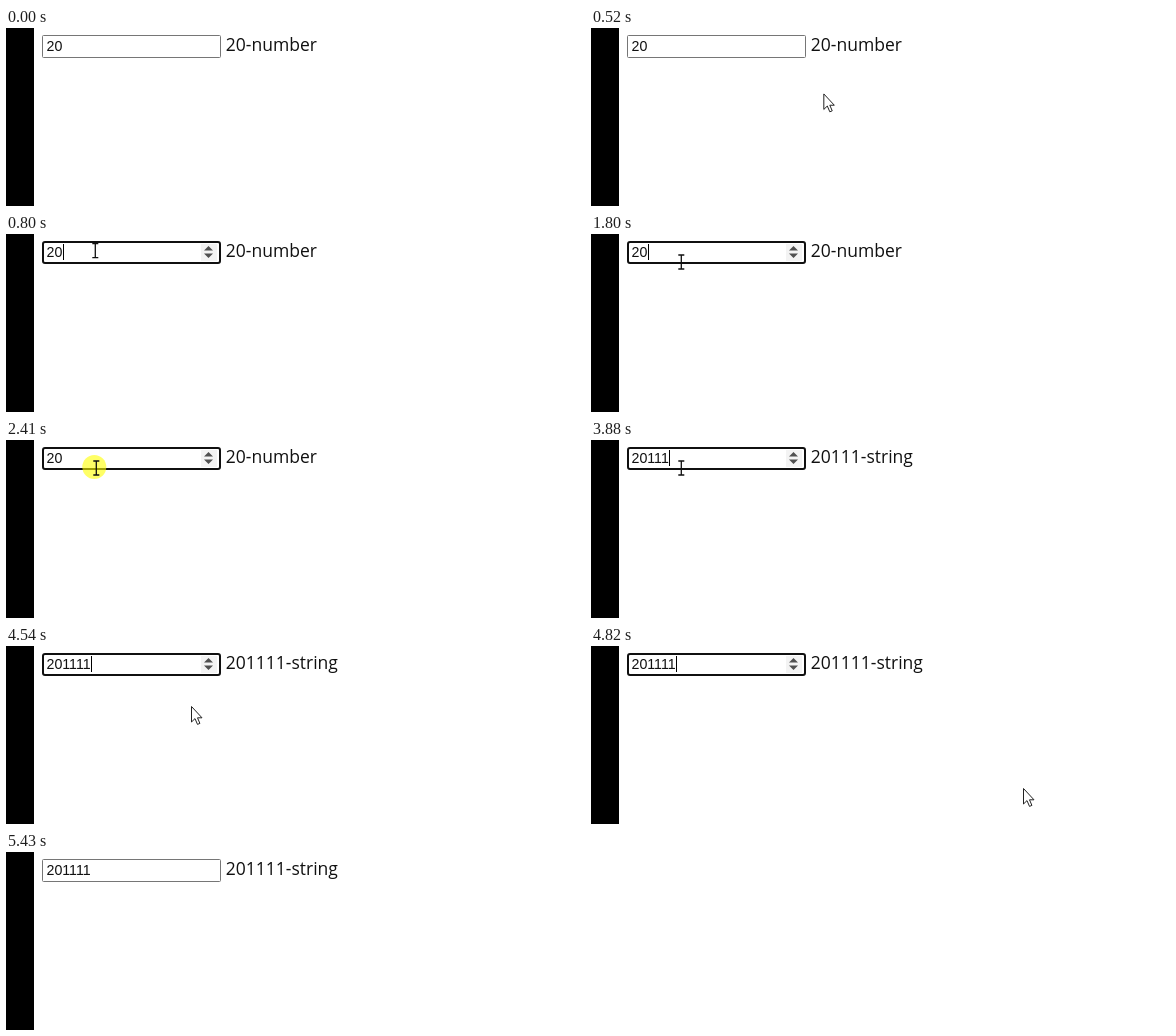
An HTML page that plays this animation: 579 by 178 pixels, repeating every 5500 ms.

```html
<!DOCTYPE html>
<html lang="en">
<head>
<meta charset="utf-8">
<style>
  html, body { margin: 0; width: 100%; height: 100%; overflow: hidden; background: #fff; }
  svg { display: block; }
  #value { font: 14.2px "Liberation Sans", Arial, sans-serif; }
  #label { font: 17.5px "Open Sans", "Noto Sans", sans-serif; }
</style>
</head>
<body>
<svg width="579" height="178" viewBox="0 0 579 178">
  <rect width="579" height="178" fill="#fff"/>
  <rect width="28" height="178"/>
  <rect id="plain" x="36.5" y="7.5" width="178" height="22" rx="1" fill="#fff" stroke="#767676"/>
  <rect id="ring" x="37" y="8" width="177" height="21" rx="2" fill="#fff" stroke="#101010" stroke-width="2"/>
  <g id="spin">
    <rect x="195" y="10" width="16" height="17" fill="#f3f3f3"/>
    <path d="M198 16.5 L202.5 12 L207 16.5 Z M198 19.5 L202.5 24 L207 19.5 Z" fill="#505050"/>
  </g>
  <text id="value" x="40.5" y="23" fill="#111"></text>
  <rect id="caret" y="10" width="1" height="16"/>
  <text id="label" x="219.8" y="23" fill="#111"></text>
  <circle id="halo" r="12" fill="#ff0" opacity=".6"/>
  <path id="beam" d="M-3 -7 H3 M0 -7 V7 M-3 7 H3" fill="none" stroke="#111" stroke-width="1.3"/>
  <path id="arrow" d="M.5 .5 V16 L4 12.6 L6.5 18.4 L8.9 17.4 L6.5 11.8 H11 Z" fill="#fff" stroke="#222"/>
</svg>
<script>
  const LOOP = 5500, FOCUS = 730, BLUR = 5430;
  const $ = id => document.getElementById(id);

  const keys = [2940, 3400, 3880, 4340];
  const caretOn = [[FOCUS, 1270], [1800, 2280], [2810, 4890]];
  const clicks = [[FOCUS, 800], [2410, 2540]];

  const within = (spans, t) => spans.some(([from, to]) => t >= from && t < to);
  const show = (id, on) => $(id).setAttribute("visibility", on ? "visible" : "hidden");
  const place = (id, x, y) => $(id).setAttribute("transform", `translate(${x} ${y})`);

  // Point on a quadratic curve, advanced in eight equal steps.
  function glide(from, bend, to, elapsed, step) {
    const u = Math.min(1, Math.floor(elapsed / step) / 8), v = 1 - u;
    return from.map((a, i) => v * v * a + 2 * u * v * bend[i] + u * u * to[i]);
  }

  function pointer(t) {
    if (t < 200 || t >= 5160) return null;
    if (t < 1000) return glide([440, 165], [200, 40], [89.3, 16.7], t - 200, 66);
    if (t < 4540) return [90.3, 28];
    return glide([185, 60], [521, 167], [501, 174], t - 4540, 68.5);
  }

  function draw(t) {
    const at = pointer(t);
    const hover = at && at[0] > 36 && at[0] < 215 && at[1] > 7 && at[1] < 30;
    const focus = t >= FOCUS && t < BLUR;
    const typed = keys.filter(k => k <= t).length;
    const value = "20" + "1".repeat(typed);

    $("value").textContent = value;
    $("label").textContent = value + (typed ? "-string" : "-number");
    $("caret").setAttribute("x", 43 + 7 * value.length);
    show("caret", within(caretOn, t));
    show("plain", !focus);
    show("ring", focus);
    show("spin", focus || hover);
    show("beam", hover);
    show("arrow", at && !hover);
    show("halo", within(clicks, t));
    if (at) {
      const [x, y] = at;
      place("beam", x, y);
      place("arrow", x, y);
      place("halo", x - 2, y - 1);
    }
  }

  const start = performance.now();
  function tick() {
    draw((performance.now() - start) % LOOP);
    requestAnimationFrame(tick);
  }
  draw(0);
  requestAnimationFrame(tick);
</script>
</body>
</html>
```
